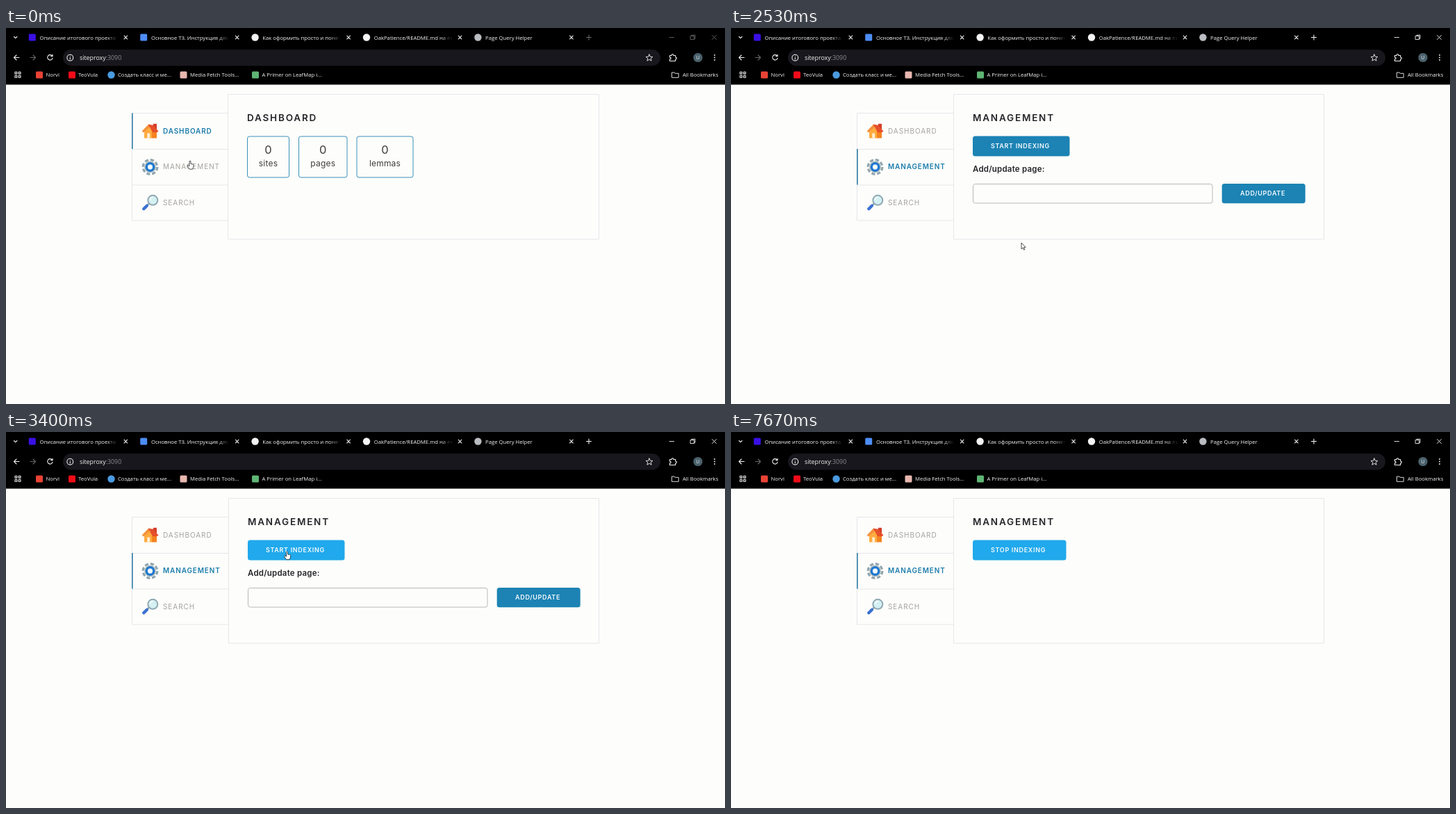
These frames come from a looping animation (1035 px wide and 541 px high, 8000 ms). An HTML page:

```html
<!DOCTYPE html>
<html lang="en">
<head>
<meta charset="utf-8">
<title>Management page</title>
<style>
  html, body { margin: 0; height: 100%; overflow: hidden; background: #fdfdfb; }
  svg { display: block; width: 1035px; height: 541px; font-family: Inter, sans-serif; }
  .chrome { font: 7.7px "Open Sans", sans-serif; fill: #f4f4f4; }
  .line { fill: none; stroke: #f0f0f0; stroke-width: 1.1; stroke-linecap: round; stroke-linejoin: round; }
  .border { fill: none; stroke: #e6e7ec; }
  .menu { font-size: 10px; letter-spacing: .95px; fill: #a5a29d; }
  .menu.on { font-weight: 600; letter-spacing: .87px; fill: #1c7dac; }
  .title { font-size: 13.5px; font-weight: 600; letter-spacing: 1.8px; fill: #25252a; }
  .count { font-size: 16.5px; text-anchor: middle; fill: #403d3a; }
  .label { font-size: 12px; letter-spacing: .2px; text-anchor: middle; fill: #403d3a; }
  .card { fill: none; stroke: #3a90bb; }
  .button { fill: #1c83b4; }
  .button.hover { fill: #20a9ec; }
  .caption { font-size: 9px; font-weight: 600; letter-spacing: .68px; fill: #f6fbfd; }
</style>
</head>
<body>
<svg viewBox="0 0 1035 541">
  <defs>
    <linearGradient id="fade">
      <stop stop-color="#000" stop-opacity="0"/><stop offset="1" stop-color="#000"/>
    </linearGradient>
  </defs>

  <rect width="1035" height="81.5"/>
  <g id="tabs" class="chrome"></g>
  <path class="line" d="M11.5 12.5l2.2 2.2 2.2-2.2"/>
  <g id="controls" class="line">
    <path d="M835.5 13.5h7M839 10v7"/>
    <path stroke-width=".9" d="M955 13.5h6.5M985.5 11.5h5v5h-5zM987 11.5v-1.3h5v5h-1.5M1016.5 10.5l6 6m0-6l-6 6"/>
  </g>

  <rect x="82" y="31" width="860" height="23.5" rx="11.7" fill="#17171d"/>
  <g class="line">
    <path d="M19 42.5h-7.5m3.5-3.5l-3.5 3.5 3.5 3.5"/>
    <path stroke="#666" d="M35 42.5h7.5m-3.5-3.5l3.5 3.5-3.5 3.5"/>
    <path d="M66.5 40.3a3.7 3.7 0 1 0 .5 3M67 38.3v2.5h-2.5"/>
    <circle cx="92.3" cy="42.7" r="4.4"/><path d="M92.3 42.5v2.3M92.3 40.5v.1"/>
    <path stroke-width=".9" d="M926 38l1.4 3.2 3.5.3-2.7 2.3.9 3.4-3.1-1.9-3.1 1.9.9-3.4-2.7-2.3 3.5-.3z"/>
    <path d="M955.5 39.5h2.7c-.3-2.4 3-2.4 2.7 0h2.8v2.6c2.3-.2 2.3 2.9 0 2.7v2.7h-8.2v-2.6c2.2-.1 2.2-2.7 0-2.8z"/>
    <path stroke-width="1.9" d="M1020 39v.01M1020 42.5v.01M1020 46v.01"/>
    <path d="M13 63.3h2.8v2.8H13zM18.2 63.3H21v2.8h-2.8zM13 68.5h2.8v2.8H13zM18.2 68.5H21v2.8h-2.8z"/>
    <path stroke-width=".9" d="M958.8 64h3.2l1.2 1.3h5v6h-9.4z"/>
  </g>
  <circle cx="996" cy="42.5" r="6.6" fill="#4b626d"/>
  <text class="chrome" x="993.3" y="45.1" style="font-size:7px">U</text>
  <text class="chrome" x="106" y="46" style="font-size:8.85px">siteproxy<tspan fill="#8c8c90">:3090</tspan></text>
  <g id="bookmarks" class="chrome"></g>
  <text class="chrome" x="974" y="70.3">All Bookmarks</text>

  <path id="frame" class="border"/>
  <rect id="marker" x="181" y="122.5" width="1.6" height="51.5" fill="#2b7ba4"/>

  <g id="house">
    <path fill="#d33f2b" d="M211.8 137.8h5.2v9h-5.2z"/>
    <path fill="#ffab40" d="M199 147l6-6 6 6v11.5h-12z"/>
    <path fill="#f5821f" d="M210 145h7v13.5h-7z"/>
    <path fill="#f4913a" d="M195.8 148.2l9.2-9.4 3.4 2.7-10.8 9z"/>
    <path fill="#e5502b" d="M204.5 138.5l7 1.2 8 8.7-2.5 1.8-6-.2z"/>
    <path fill="#fff0d8" d="M203.3 151.5h3.8v7h-3.8z"/>
  </g>
  <g transform="translate(207.5 200)" fill="none">
    <circle r="10.3" stroke="#8fa5ae" stroke-width="3.2" stroke-dasharray="5.2 2.89"/>
    <circle r="8.3" fill="#a2b4ba"/>
    <circle r="5.2" fill="#d9eefa" stroke="#1976d2" stroke-width="3"/>
    <circle r="2.6" fill="#fbfdfd"/>
  </g>
  <g stroke-linecap="round">
    <path stroke="#8fa7b2" stroke-width="2.5" d="M203 255.5l3-3"/>
    <path stroke="#3a70d2" stroke-width="4.3" d="M198.3 260.3l4.5-4.5"/>
    <circle cx="211.3" cy="247.8" r="7" fill="#d4f0f3" stroke="#8fa9b3" stroke-width="2"/>
    <path fill="none" stroke="#fff" stroke-width="1.5" d="M207.6 247a4 4 0 0 1 3.4-3.4"/>
  </g>
  <text class="menu" x="226" y="151.7">DASHBOARD</text>
  <text class="menu" x="226" y="202.8">MANAGEMENT</text>
  <text class="menu" x="226" y="254.6">SEARCH</text>

  <g id="dashboard">
    <text class="title" x="347" y="133.9">DASHBOARD</text>
    <g id="cards"></g>
  </g>
  <g id="management">
    <text class="title" x="348" y="133.9">MANAGEMENT</text>
    <rect id="button" class="button" x="348" y="155.5" width="139.5" height="29" rx="3.5"/>
    <text id="caption" class="caption" x="374" y="173.2"></text>
    <g id="form">
      <text x="348" y="207" font-size="11.5" font-weight="600" letter-spacing=".22" fill="#25252a">Add/update page:</text>
      <rect x="348.5" y="224.5" width="344.5" height="27.5" rx="3" fill="none" stroke="#b9b9b7"/>
      <rect class="button" x="706.7" y="224" width="120" height="28.3" rx="3.5"/>
      <text class="caption" x="733" y="241.2">ADD/UPDATE</text>
    </g>
  </g>

  <g id="cursor" fill="#fff" stroke="#222" stroke-width=".8" stroke-linejoin="round">
    <path id="arrow" d="M0 0v9l2-1.9 1.5 3.2 1.4-.7-1.4-3h2.6z"/>
    <path id="hand" d="M-1 .8q1-1.6 2 0v3.7l3.2.6q1.1.4 1 1.7l-.6 3-1 2.3h-4.4l-3-4.2q-.6-1.4.8-1.4l2 1.2z"/>
  </g>
</svg>

<script>
const LOOP = 8000;
const $ = id => document.getElementById(id);
const show = (id, on) => $(id).style.display = on ? '' : 'none';
const square = (x, y, color) => `<rect x="${x - 5}" y="${y - 5}" width="10" height="10" rx="1.5" fill="${color}"/>`;
const disc = (x, y, color) => `<circle cx="${x}" cy="${y}" r="5.2" fill="${color}"/>`;

$('tabs').innerHTML = [
  [square, '#3a10e5', 'Описание итогового проекта'],
  [square, '#4d8df6', 'Основное ТЗ. Инструкция для работы'],
  [disc, '#f4f4f4', 'Как оформить просто и понятно текст'],
  [disc, '#f4f4f4', 'OakPatience/README.md на main'],
  [disc, '#b9bcc0', 'Page Query Helper'],
].map(([icon, color, text], i) => {
  const x = 48.5 + 160.4 * i;
  return `${icon(x - 10.7, 13.5, color)}<text x="${x}" y="16.5">${text}</text>
    <rect x="${x + 96}" y="5" width="16" height="18" fill="url(#fade)"/>
    <rect x="${x + 112}" y="5" width="40" height="18" fill="#000"/>
    <path class="line" d="M${x + 121.5} 11.2l4.6 4.6m0-4.6l-4.6 4.6"/>`;
}).join('');

$('bookmarks').innerHTML = [
  [48, 57.5, square, '#e94335', 'Norvi'],
  [95, 104, square, '#f00c18', 'TeoVula'],
  [151.5, 161, disc, '#4a9be0', 'Создать класс и ме...'],
  [255.5, 265, square, '#e8b8b0', 'Media Fetch Tools...'],
  [359, 368.5, square, '#5fb573', 'A Primer on LeafMap i...'],
].map(([ix, x, icon, color, text]) =>
  `${icon(ix, 67.5, color)}<text x="${x}" y="70.3">${text}</text>`).join('');

$('cards').innerHTML = [[347.5, 60, 'sites'], [421.5, 69.5, 'pages'], [505, 81, 'lemmas']]
  .map(([x, w, name]) => `<rect class="card" x="${x}" y="156" width="${w}" height="59" rx="3"/>
    <text class="count" x="${x + w / 2}" y="181">0</text>
    <text class="label" x="${x + w / 2}" y="199">${name}</text>`).join('');

// Pointer path: time, x, y; equal times make a jump.
const path = [
  [0, 265, 191], [30, 265, 191], [830, 258, 195], [1100, 256.5, 196.5], [1930, 256.5, 196.5],
  [2170, 418, 309], [2560, 418, 309], [3000, 417.5, 160], [3200, 416, 149], [3230, 415, 150],
  [3400, 404.5, 171.5], [4330, 404.5, 171.5], [4330, 404.5, 175], [4630, 404.5, 175],
  [4630, 420.5, 273.5], [4830, 420.5, 273.5], [4830, 412, 273.5], [LOOP, 412, 273.5],
];

function pointerAt(t) {
  const i = path.findIndex(p => p[0] > t);
  const [t0, x0, y0] = path[i - 1], [t1, x1, y1] = path[i];
  const k = (t - t0) / (t1 - t0), e = k * k * (3 - 2 * k);
  return [x0 + (x1 - x0) * e, y0 + (y1 - y0) * e];
}

const inside = (x, y, l, t, r, b) => x >= l && x <= r && y >= t && y <= b;
const menuItems = document.querySelectorAll('.menu');

function render(now) {
  const t = now % LOOP;
  const managing = t >= 1900, indexing = t >= 4030;
  const [x, y] = pointerAt(t);
  const overButton = managing && inside(x, y, 348, 155, indexing ? 482 : 487, 184);
  const hand = overButton || inside(x, y, 181, 122, 320, 277);
  const left = managing ? 320.5 : 319.5;

  $('controls').style.stroke = managing ? '#f0f0f0' : '#666';
  $('frame').setAttribute('d', `M${left} 95.5H853.5V304H${left}zM${left} 122.5H181.5V277H${left}M181.5 174.5H${left}M181.5 226H${left}`);
  $('marker').setAttribute('y', managing ? 174 : 122.5);
  menuItems.forEach((item, i) => item.classList.toggle('on', i === +managing));

  show('dashboard', !managing);
  show('management', managing);
  show('form', !indexing);
  $('button').classList.toggle('hover', overButton || indexing);
  $('button').setAttribute('width', indexing ? 134.5 : 139.5);
  $('caption').textContent = indexing ? 'STOP INDEXING' : 'START INDEXING';

  show('cursor', t < 7670);
  show('hand', hand);
  show('arrow', !hand);
  $('cursor').setAttribute('transform', `translate(${x} ${y})`);
}

function tick() {
  render(performance.now());
  requestAnimationFrame(tick);
}
tick();
</script>
</body>
</html>
```
